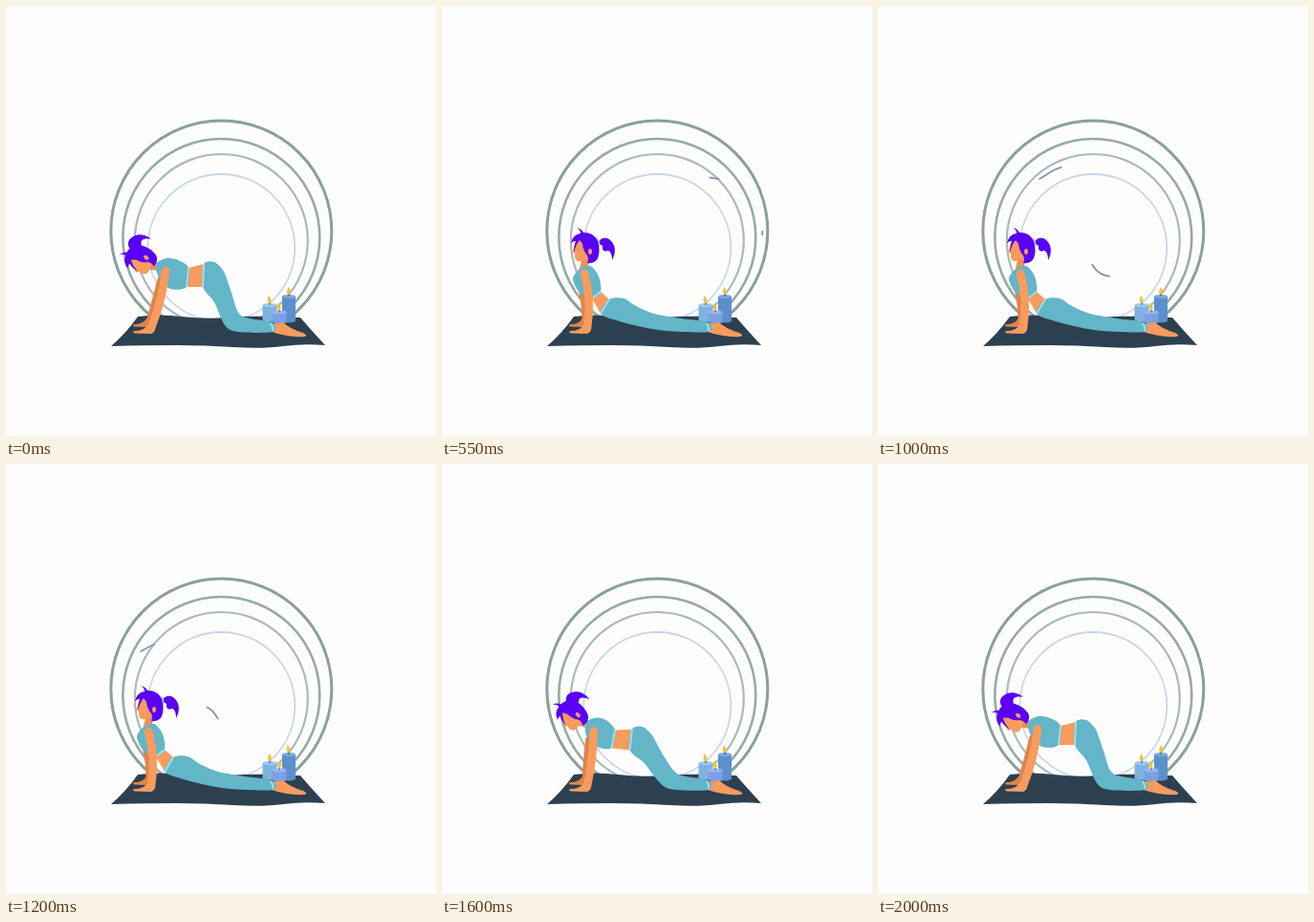
These frames come from a looping animation (450x450 px, 2.05 s). An HTML page:

```html
<!DOCTYPE html>
<html lang="en">
<head>
<meta charset="utf-8">
<title>Yoga stretch</title>
<style>
  html, body { margin: 0; width: 100%; height: 100%; overflow: hidden; background: #fdfdfd; }
  svg { display: block; width: 100vw; height: 100vh; }
  .ring, .wind, .arm, .neck, .band { fill: none; }
  .arm, .neck, .wind { stroke-linecap: round; stroke-linejoin: round; }
  .skin { fill: #f99b5d; }
  .shade { fill: #dd8548; }
  .cloth { fill: #63b5c8; }
  .hair { fill: #5a00f5; }
  .band { stroke: #9be0ec; stroke-width: 2; }
  .neck { stroke: #ee9052; stroke-width: 8; }
  .wind { stroke: #8494ad; stroke-width: 1.8; stroke-linecap: butt; }
</style>
</head>
<body>
<svg viewBox="0 0 450 450">
  <g id="rings"></g>
  <path fill="#2c4050" d="M138 325Q160 322 184 325T232 326T276 325T308 326Q320 340 334 355Q312 353 290 356T238 357T178 355T110 356Q126 342 138 325Z"/>
  <g id="candles"></g>

  <path class="arm" id="backArm" stroke="#dd8548" stroke-width="7"/>
  <path class="shade" d="M147 327L153 328Q153 335 149 336L134 335.500Q131 334 135 333Q143 333 147 327Z"/>

  <path class="skin" d="M277 332Q284 333 290 331Q297 338 311 342Q317 345 312 346Q295 347 278 341Z"/>
  <path class="skin" id="waist"/>
  <path class="cloth" id="pants"/>
  <path class="band" d="M277 332Q280 336 279 340"/>
  <path class="band" id="waistBand"/>
  <path class="neck" id="neck"/>
  <path class="cloth" id="top"/>
  <path class="band" id="topBand"/>

  <path class="arm" id="frontArm" stroke="#f99b5d" stroke-width="8.500"/>
  <path class="skin" d="M148 334L156 334Q157 341 152 343L135 342.500Q131 341 135 340Q144 340 148 334Z"/>

  <g id="tail">
    <path class="hair" d="M0 1C3 -5 10 -6 14 -1C19 4 19 12 15 19C15 12 13 9 10 9C7 11 4 8 5 4Z"/>
    <path class="band" d="M-1 -4Q2 0 1 5"/>
  </g>
  <g id="head">
    <path class="skin" d="M-7 -10L-10 -2L-13 4L-10 6L-10 10Q-9 15 -4 14L5 12L8 -4Z"/>
    <path class="hair" d="M-14 -5Q-12 -14 -4 -15Q-4 -19 -8 -21Q-3 -20 -1 -16Q10 -16 14 -7Q17 3 14 11Q11 17 3 16Q5 12 3 8Q-1 4 -2 -4L-5 -8Q-9 -3 -11 5Q-11 -3 -9 -7Q-12 -7 -14 -5Z"/>
    <ellipse class="skin" cx="6" cy="4" rx="2" ry="3"/>
  </g>
  <path class="wind" d="M339 225C338 200 312 184 283 180C250 174 210 156 180 174C153 193 119 200 123 222"/>
  <path class="wind" d="M335 234C341 262 270 285 246 283C236 283 230 280 225 272C217 257 208 248 201 259L195 269"/>
</svg>
<script>
const LOOP = 2050, STEP = 50;
const $ = id => document.getElementById(id);
const set = (id, d) => $(id).setAttribute('d', d);

// centre y, radius, colour, stroke width
$('rings').innerHTML = [
  [235.5, 115.5, '#8a9f9b', 3], [242, 103, '#96aaa6', 2.6],
  [245.5, 90.5, '#a9bab9', 2.2], [253, 77, '#c9d5eb', 1.8]
].map(([y, r, c, w]) =>
  `<circle class="ring" cx="225.3" cy="${y}" r="${r}" stroke="${c}" stroke-width="${w}"/>`).join('');

// left, top, width, bottom, body colour, rim colour
$('candles').innerHTML = [
  [289, 304, 14, 330, '#5c8fcb', '#79a9dd'],
  [268.5, 313, 15, 329, '#80b3df', '#9cc9ee'],
  [278.5, 320.500, 15, 331, '#7b9fe2', '#9ab8f0']
].map(([x, y, w, b, c, rim]) => {
  const m = x + w / 2;
  return `<path fill="${c}" d="M${x} ${y}H${x + w}V${b}Q${m} ${b + 3} ${x} ${b}Z"/>
    <ellipse cx="${m}" cy="${y}" rx="${w / 2}" ry="2" fill="${rim}"/>
    <path d="M${m} ${y}v-4" stroke="#46506a"/>
    <g transform="translate(${m} ${y - 2})"><path class="flame" fill="#f0c435" d="M0 0C-4 -2 -1 -5 -.5 -8C2 -5 3 -2 0 0Z"/></g>`;
}).join('');

// all fours, half way down, cobra
const poses = [
  {
    top: [157,270, 168,264, 180,266, 191,274, 189,294, 172,296, 160,284],
    leg: [207,270, 218,268, 228,278, 236,300, 246,324, 242,341, 229,334, 218,310, 206,294],
    arm: [167,277, 163,306], head: [140,266,-56], tail: [131,256,-82]
  },
  {
    top: [146,270, 154,267, 164,269, 173,282, 168,300, 153,295, 143,282],
    leg: [192,284, 204,281, 214,290, 228,309, 248,325, 240,340, 226,332, 206,315, 189,304],
    arm: [152,281, 153,306], head: [131,261,-25], tail: [131,249,-52]
  },
  {
    top: [143,276, 155,272, 164,283, 166,299, 157,306, 144,300, 137,286],
    leg: [175,307, 190,306, 203,314, 222,322, 250,327, 235,340, 210,336, 186,330, 166,322],
    arm: [149,280, 156,307], head: [149,253,0], tail: [163,247,0]
  }
];

// time, middle of the dash along its path, dash length
const winds = [
  [[290, 0, 3], [550, .29, 11], [1000, .7, 27], [1400, .98, 7], [1450, 1, 0]],
  [[500, 0, 2], [550, .02, 5], [1000, .69, 24], [1400, .96, 12], [1450, 1, 0]]
];
const windPaths = [...document.querySelectorAll('.wind')];
const windSizes = windPaths.map(p => p.getTotalLength());
const flames = [...document.querySelectorAll('.flame')];

const mix = (a, b, k) => a.map((v, i) => v + (b[i] - v) * k);
const ease = x => (1 - Math.cos(Math.PI * Math.min(1, Math.max(0, x)))) / 2;
const pairs = a => a.reduce((out, v, i) => (i % 2 ? out[out.length - 1].push(v) : out.push([v]), out), []);
const line = pts => 'M' + pts.map(p => p.join(' ')).join('L');

// closed smooth outline through the points
function smooth(pts) {
  const n = pts.length, at = i => pts[(i + n) % n];
  let d = 'M' + pts[0].join(' ');
  for (let i = 0; i < n; i++) {
    const [a, b, c, e] = [at(i - 1), at(i), at(i + 1), at(i + 2)];
    const k = 7;
    d += `C${b[0] + (c[0] - a[0]) / k} ${b[1] + (c[1] - a[1]) / k} ` +
      `${c[0] - (e[0] - b[0]) / k} ${c[1] - (e[1] - b[1]) / k} ${c[0]} ${c[1]}`;
  }
  return d + 'Z';
}

function drawBody(p) {
  const i = Math.min(1, Math.floor(p));
  const part = name => mix(poses[i][name], poses[i + 1][name], p - i);
  const top = pairs(part('top')), leg = pairs(part('leg'));
  const [sx, sy, ex, ey] = part('arm');
  const [hx, hy, ha] = part('head'), [tx, ty, ta] = part('tail');
  const w1 = leg[0], w2 = leg[8];

  set('top', smooth(top));
  set('topBand', line([top[3], top[4]]));
  set('waist', line([top[3], w1, w2, top[4]]) + 'Z');
  set('pants', smooth([...leg.slice(0, 5), [278, 331], [279, 341], ...leg.slice(5)]));
  set('waistBand', line([w1, w2]));
  set('frontArm', `M${sx} ${sy}Q${ex + 1} ${ey} 152 337`);
  set('backArm', `M${sx - 5} ${sy + 9}Q${ex - 6} ${ey} 150 331`);
  set('neck', line([[hx + 3, hy + 5], [top[0][0] + 4, top[0][1] + 3]]));
  $('head').setAttribute('transform', `translate(${hx} ${hy}) rotate(${ha})`);
  $('tail').setAttribute('transform', `translate(${tx} ${ty}) rotate(${ta})`);
}

function drawWind(t, n) {
  const keys = winds[n], path = windPaths[n];
  const i = keys.findIndex((k, j) => j < keys.length - 1 && t >= k[0] && t < keys[j + 1][0]);
  path.style.display = i < 0 ? 'none' : '';
  if (i < 0) return;
  const a = keys[i], b = keys[i + 1];
  const [, mid, len] = mix(a, b, (t - a[0]) / (b[0] - a[0]));
  const size = windSizes[n];
  const from = Math.max(0, mid * size - len / 2), to = Math.min(size, mid * size + len / 2);
  path.setAttribute('stroke-dasharray', `0 ${from} ${to - from} ${size * 2}`);
}

function draw(now) {
  const t = Math.floor(now % LOOP / STEP) * STEP;
  drawBody(2 * (ease((t - 50) / 500) - ease((t - 1250) / 540)));
  winds.forEach((_, n) => drawWind(t, n));
  flames.forEach((f, n) =>
    f.setAttribute('transform', `skewX(${8 * Math.sin(t / LOOP * Math.PI * 8 + n)})`));
}

const start = performance.now();
function tick() {
  draw(performance.now() - start);
  requestAnimationFrame(tick);
}
tick();
</script>
</body>
</html>
```
